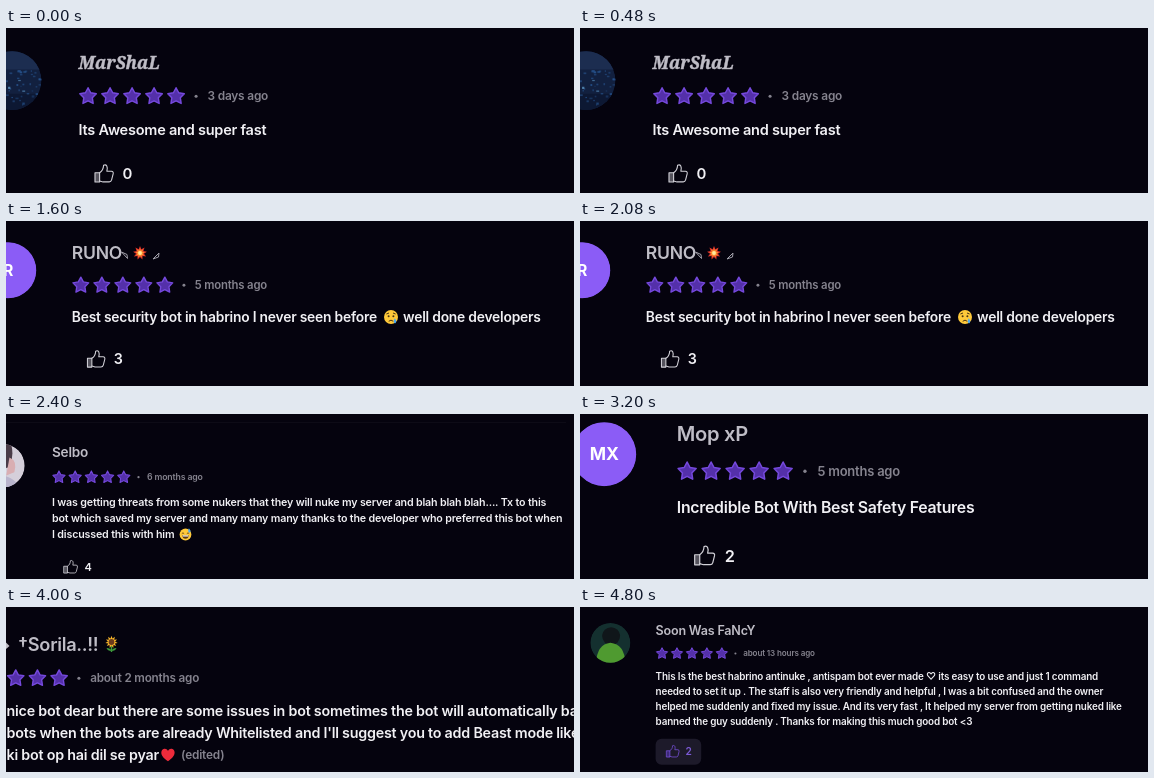
These frames come from a looping animation (568x165 px, 5.6 s). An HTML page:

```html
<!DOCTYPE html>
<html lang="en">
<head>
<meta charset="utf-8">
<title>Reviews</title>
<style>
  html, body { margin: 0; width: 100%; height: 100%; overflow: hidden; background: #05030e; }
  #strip svg { display: block; width: 568px; height: 165px; overflow: hidden; }
  text { font-family: Inter, "DejaVu Sans", sans-serif; letter-spacing: -.016em; white-space: pre; }
  .name { font-size: 16.8px; font-weight: 600; fill: #bfbdc6; }
  .fancy { font: italic 900 15.6px "Noto Serif", serif; letter-spacing: 0; stroke: #bfbdc6; stroke-width: .4; }
  .time { font-size: 10.8px; font-weight: 600; fill: #85838e; }
  .body { font-size: 13.2px; font-weight: 600; fill: #f1f0f4; }
  .count { font-size: 13.6px; font-weight: 600; fill: #f1f0f4; }
  .initials { font-size: 14.6px; font-weight: 700; fill: #fff; text-anchor: middle; }
  .star { fill: #5430aa; stroke: #7549dc; stroke-width: 1.3; stroke-linejoin: round; }
  .like { fill: none; stroke: #d2d1d8; stroke-width: 1; stroke-linejoin: round; stroke-linecap: round; }
  .cuff { fill: #55535d; }
  .active .like { stroke: #7c52e0; }
  .active .cuff { fill: #3d2a78; }
  .active .count { fill: #7c5ad6; }
  .mark { fill: none; stroke: #a3a1ab; stroke-width: 1; stroke-linejoin: round; }
</style>
</head>
<body>
<div id="strip"></div>
<script>
const HOLD = 800;
const UNIT = 20; // star spacing in card coordinates
const LINE = 20.2;

const text = (cls, x, y, s) =>
  `<text class="${cls}" x="${x}" y="${y}">${s.replace(/</g, '&lt;')}</text>`;
const circle = (x, y, r, fill) => `<circle cx="${x}" cy="${y}" r="${r}" fill="${fill}"/>`;
const path = (d, fill) => `<path d="${d}" fill="${fill}"/>`;
const at = (x, y, k, s) => `<g transform="translate(${x} ${y}) scale(${k})">${s}</g>`;

function spikes(n, outer, inner) {
  const pts = [];
  for (let i = 0; i < n * 2; i++) {
    const a = i * Math.PI / n - Math.PI / 2, r = i % 2 ? inner : outer;
    pts.push((Math.cos(a) * r).toFixed(2) + ',' + (Math.sin(a) * r).toFixed(2));
  }
  return pts.join(' ');
}
const poly = (n, outer, inner, attr) => `<polygon points="${spikes(n, outer, inner)}" ${attr}/>`;

function random(seed) {
  return () => (seed = seed * 16807 % 2147483647) / 2147483647;
}

const thumb = `<g class="like"><rect class="cuff" x="-8.3" y="-.8" width="4.2" height="8.4"/>
  <path d="M-4.1-.8C-1.6-2.4-.6-4.4-.5-7.6C2.2-8.8 3.6-6.4 2.5-2.2H6.6Q8.7-2 8.2 .2L6.8 5.7Q6.3 7.5 4.6 7.5H-1L-4.1 6.6"/></g>`;

// Emoji, drawn about 14 px wide
const face = circle(0, 0, 7, '#ffc93a');
const emoji = {
  burst: poly(9, 7.4, 4.2, 'fill="#e0352b"') + poly(9, 5, 2.6, 'fill="#ff9a2e"') + circle(0, 0, 2, '#ffe9a0'),
  sad: face + circle(-2.4, -.8, 1, '#4b3412') + circle(2.4, -.8, 1, '#4b3412') +
    '<path d="M-2.3 4.3Q0 2 2.3 4.3M-4.6-3L-2-4M4.6-3L2-4" fill="none" stroke="#4b3412"/>' +
    path('M3.8 1.2Q6.6 4.8 4 6.4Q1.4 5 3.8 1.2', '#4aa8f0'),
  sweat: face + path('M-4 .8H4Q3.4 5 0 5T-4 .8', '#5a3a14') + path('M-3.4 1H3.4V2.4H-3.4Z', '#fff') +
    '<path d="M-4.4-1Q-3-3-1.6-1M1.6-1Q3-3 4.4-1" fill="none" stroke="#5a3a14"/>' +
    path('M4-7.4Q7.4-3.6 5-2.2Q2-2.4 4-7.4', '#4aa8f0'),
  flower: path('M-.7 2H.7V8H-.7ZM0 7Q-4 7-5 4Q-1 4 0 7Q1 4 5 4Q4 7 0 7', '#3f9d3c') +
    at(0, -2, 1, poly(11, 6.2, 3.6, 'fill="#f8b62a"') + circle(0, 0, 2.9, '#6b3a1c')),
  heart: path('M0 6.2C-10-.2-6.6-6.2-3.2-6.2C-1.4-6.2-.4-5 0-4C.4-5 1.4-6.2 3.2-6.2C6.6-6.2 10-.2 0 6.2', '#ee2b3b')
};

// Avatars, inside a disc of radius 26.7
function city() {
  const rnd = random(71);
  let s = circle(0, 0, 27, '#12203f') + path('M-27-27H27V-10H-27Z', '#1c2d50') + path('M-27 12H27V27H-27Z', '#0d1833');
  for (let i = 0; i < 70; i++) {
    s += `<rect x="${rnd() * 54 - 27}" y="${rnd() * 34 - 10}" width="${1 + rnd() * 2}" height="${1 + rnd()}"
      fill="${rnd() < .25 ? '#6fb4e6' : '#27548f'}" opacity="${.4 + rnd() * .5}"/>`;
  }
  return s;
}
const letters = s => circle(0, 0, 27, '#8b5cf6') + text('initials', 0, 5.2, s);
const pale = circle(0, 0, 27, '#d5cfda') + path('M-27-27H10Q14-12 8 2L-27 8Z', '#4a3c48') +
  path('M8-10Q18-6 14 8L4 12Z', '#d9aeb2') + path('M-27 12Q8 6 22 27H-27Z', '#b9b4cc');
const violet = circle(0, 0, 27, '#1b0f34') + '<ellipse cx="0" cy="-7" rx="20" ry="20" fill="#dcd8e6"/>' +
  path('M-27 6Q0 16 27 6V27H-27Z', '#6a3cc0');
const green = circle(0, 0, 27, '#14302f') + circle(1, -9, 12, '#10161a') +
  path('M-19 27Q-18 2 0 0Q19 2 20 27Z', '#4f9a30');

// x: left text edge, y: middle of the stars, u: star spacing
const cards = [
  { x: 72.6, y: 68, u: 22, name: 'MarShaL', cls: 'name fancy', time: '3 days ago', likes: 0, avatar: city(),
    lines: ['Its Awesome and super fast'] },
  { x: 105.3, y: 57.5, u: 21.3, name: '- Heron', time: 'about 1 month ago', likes: 2, avatar: violet,
    lines: ["Best security habrino bot no one can't nuke your server"] },
  { x: 65.8, y: 64, u: 21, name: 'RUNO', time: '5 months ago', likes: 3, avatar: letters('R'),
    lines: ['Best security bot in habrino I never seen before'],
    extra: at(385, 96, 1, emoji.sad) + at(397, 101.2, 1.05, text('body', 0, 0, 'well done developers')) +
      at(134, 32, .95, emoji.burst) +
      '<path class="mark" d="M115.5 31L121.5 37.5L121 33.5ZM147 38L153 32L152.5 36Z"/>' },
  { x: 46, y: 63, u: 16.2, name: 'Selbo', time: '6 months ago', likes: 4, avatar: pale,
    lines: ['I was getting threats from some nukers that they will nuke my server and blah blah blah.... Tx to this',
      'bot which saved my server and many many many thanks to the developer who preferred this bot when',
      'I discussed this with him'],
    extra: at(179.5, 120.5, .84, emoji.sweat) + '<rect y="8" width="560" height="1" fill="#0d0b16"/>' },
  { x: 96.8, y: 57, u: 24, name: 'Mop xP', time: '5 months ago', likes: 2, avatar: letters('MX'),
    lines: ['Incredible Bot With Best Safety Features'] },
  { x: -43, y: 71, u: 21.7, name: '†Sorila..!!', nameX: 12, bodyX: .5, time: 'about 2 months ago',
    lines: ['nice bot dear but there are some issues in bot sometimes the bot will automatically ba',
      "bots when the bots are already Whitelisted and I'll suggest you to add Beast mode like",
      'ki bot op hai dil se pyar'],
    extra: at(105.5, 37, 1, emoji.flower) + at(162, 148, 1, emoji.heart) +
      at(175, 152, 1.1, text('time', 0, 0, '(edited)')) + path('M0 35.5L3.5 39L0 42Z', '#bfbdc6') },
  { x: 75.6, y: 46.3, u: 14.95, name: 'Soon Was FaNcY', time: 'about 13 hours ago', likes: 2, avatar: green, active: true,
    lines: ['This Is the best habrino antinuke , antispam bot ever made ♡ its easy to use and just 1 command',
      'needed to set it up . The staff is also very friendly and helpful , I was a bit confused and the owner',
      'helped me suddenly and fixed my issue. And its very fast , It helped my server from getting nuked like',
      'banned the guy suddenly . Thanks for making this much good bot <3'] }
];

function likes(c) {
  const y = 70.6 + (c.lines.length - 1) * LINE;
  const button = c.active ? `<rect y="${y - 17}" width="61" height="35" rx="8" fill="#1d1a2a"/>` : '';
  return `<g class="${c.active ? 'active' : ''}">${button}${at(23.2, y, 1, thumb)}` +
    `${text('count', 40, y + 4.9, String(c.likes))}</g>`;
}

function card(c) {
  const k = c.u / UNIT;
  const local = px => px === undefined ? 0 : (px - c.x) / k;
  let s = '';
  if (c.avatar) s += `<g transform="translate(-60.5 -14)"><g clip-path="url(#disc)">${c.avatar}</g></g>`;
  s += text(c.cls || 'name', local(c.nameX), -24.6, c.name);
  for (let i = 0; i < 5; i++) s += at(8.6 + i * UNIT, .4, 1, poly(5, 7.9, 4.1, 'class="star"'));
  s += circle(106.8, .2, 1.4, '#85838e') + text('time', 117.2, 3.8, c.time);
  c.lines.forEach((line, i) => s += text('body', local(c.bodyX), 35.4 + i * LINE, line));
  if (c.likes !== undefined) s += likes(c);
  return `<svg viewBox="0 0 568 165">${at(c.x, c.y, k, s)}${c.extra || ''}</svg>`;
}

const strip = document.getElementById('strip');
strip.innerHTML = cards.map(card).join('');
strip.firstChild.insertAdjacentHTML('afterbegin', '<defs><clipPath id="disc"><circle r="26.7"/></clipPath></defs>');

strip.animate(
  [{ transform: 'translateY(0)' }, { transform: `translateY(${-165 * cards.length}px)` }],
  { duration: HOLD * cards.length, iterations: Infinity, easing: `steps(${cards.length})` }
);
</script>
</body>
</html>
```
